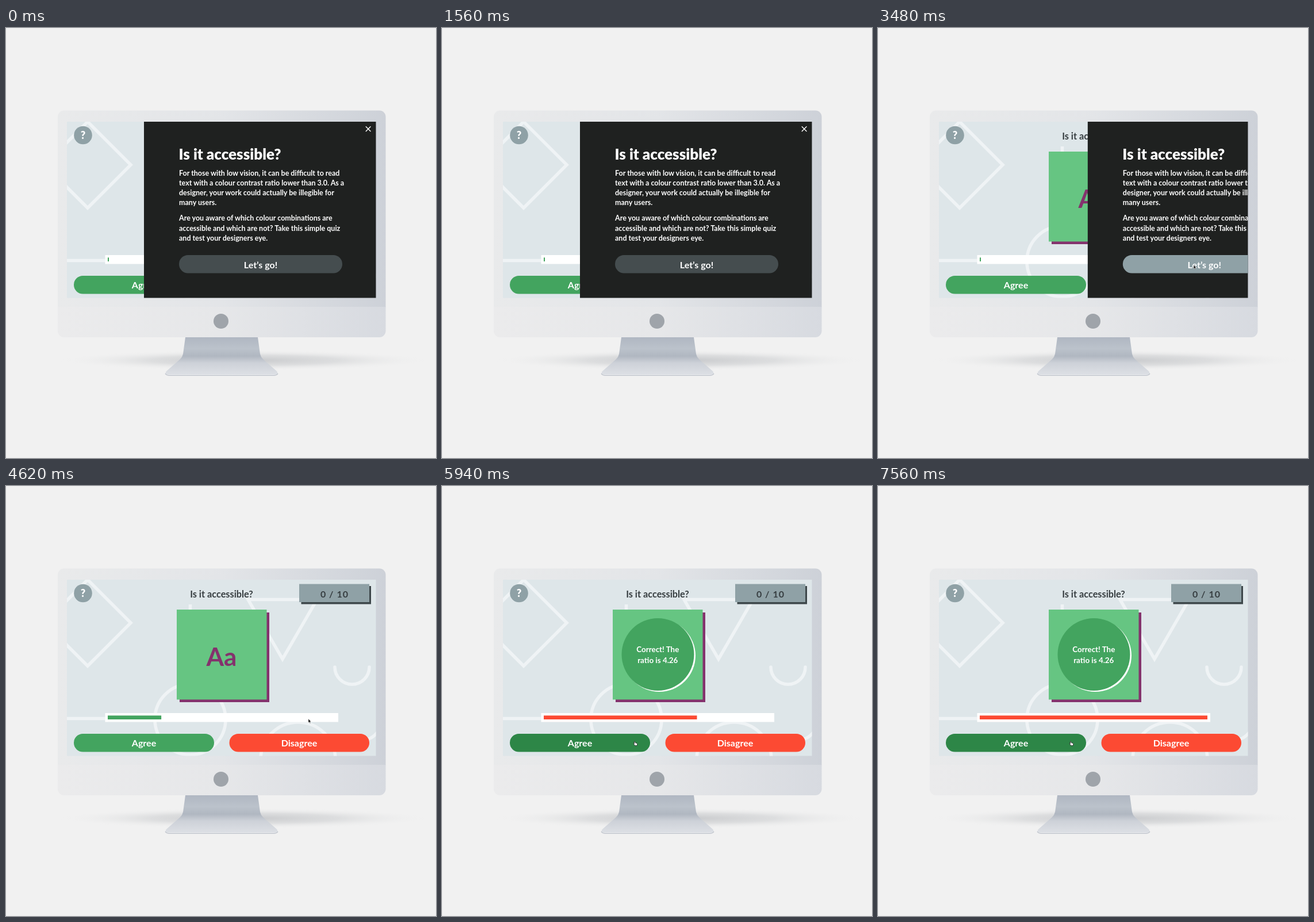
These frames come from a looping animation (748 by 748 pixels, 7.59 s). An HTML page:

```html
<!DOCTYPE html>
<html lang="en">
<head>
<meta charset="utf-8">
<title>Is it accessible?</title>
<style>
  html, body { margin: 0; width: 100%; height: 100%; overflow: hidden; background: #f1f1f1; }
  svg { display: block; width: 100vw; height: 100vh; }
  text { font-family: Lato, "Open Sans", sans-serif; font-weight: 700; fill: #fff; }
  .mid { text-anchor: middle; }
  .label { font-size: 16px; }
  .body { font-size: 12.5px; }
  .note { font-size: 13.4px; }
  .title { font-size: 26px; font-weight: 900; }
</style>
</head>
<body>
<svg viewBox="0 0 748 748">
  <defs>
    <linearGradient id="bezel">
      <stop offset="0" stop-color="#e9eaeb"/>
      <stop offset=".5" stop-color="#e3e5e8"/>
      <stop offset="1" stop-color="#cdd1d8"/>
    </linearGradient>
    <linearGradient id="chin">
      <stop offset="0" stop-color="#ebebec"/>
      <stop offset=".5" stop-color="#e6e7e9"/>
      <stop offset="1" stop-color="#d7dae0"/>
    </linearGradient>
    <linearGradient id="stand" x2="0" y2="1">
      <stop offset="0" stop-color="#b0b7c2"/>
      <stop offset=".3" stop-color="#bbc2cb"/>
      <stop offset=".5" stop-color="#b0b7c1"/>
      <stop offset=".68" stop-color="#cdd1d8"/>
      <stop offset="1" stop-color="#dde0e5"/>
    </linearGradient>
    <radialGradient id="shade">
      <stop offset="0" stop-color="#9da0a5" stop-opacity=".5"/>
      <stop offset=".5" stop-color="#adb0b4" stop-opacity=".3"/>
      <stop offset="1" stop-color="#f1f1f1" stop-opacity="0"/>
    </radialGradient>
    <clipPath id="screen"><rect x="106" y="163" width="537.5" height="306.5"/></clipPath>
    <clipPath id="case"><rect x="90" y="143.5" width="570.5" height="394.5" rx="11"/></clipPath>
  </defs>

  <rect width="748" height="748" fill="#f1f1f1"/>
  <ellipse cx="415" cy="578" rx="325" ry="18" fill="url(#shade)"/>
  <path d="M312 538H438L442 567Q443 572 447 576L471 597Q475 602 469 603.5H281Q275 602 279 597L303 576Q307 572 308 567Z" fill="url(#stand)"/>
  <path d="M277 601Q279 604.5 284 604.5H466Q471 604.5 473 601" fill="none" stroke="#b9bec7" stroke-width="1.2"/>

  <g clip-path="url(#case)">
    <rect x="90" y="143" width="571" height="343" fill="url(#bezel)"/>
    <rect x="90" y="485" width="571" height="53" fill="url(#chin)"/>
  </g>
  <circle cx="374" cy="510" r="13" fill="#9fa4aa"/>

  <g clip-path="url(#screen)">
    <rect x="106" y="163" width="538" height="307" fill="#dee6e9"/>
    <g fill="none" stroke="#eff3f5" stroke-width="5.5">
      <path d="M142 163L217 238L142 313L67 238Z"/>
      <path d="M106 404.5H258M320.5 206V343"/>
      <circle cx="320.5" cy="406" r="61.5"/>
      <path d="M421 197.5H541L481 301Z"/>
      <path d="M572 315A30 30 0 0 0 632 315" stroke-linecap="round"/>
      <circle cx="508" cy="476" r="65"/>
      <path d="M628 441Q639 438 648 426"/>
    </g>

    <circle cx="134" cy="186.5" r="15.8" fill="#8fa1a6"/>
    <text x="134" y="193" class="mid" font-size="18" style="font-weight:900">?</text>
    <text x="375" y="193.5" class="mid" font-size="16.3" style="fill:#363d40">Is it accessible?</text>

    <rect x="513.5" y="174" width="121.5" height="31.5" fill="#3d474a"/>
    <rect x="510" y="170.5" width="122" height="31.5" fill="#8fa1a6"/>
    <text x="571.5" y="193.5" class="mid" font-size="16" letter-spacing="1" style="fill:#363d40">0 / 10</text>

    <rect x="302" y="220" width="156" height="156" fill="#84326d"/>
    <rect x="297" y="215" width="156.5" height="156.5" fill="#66c582"/>
    <text x="375" y="313" class="mid" font-size="44" style="fill:#84326d" id="sample">Aa</text>
    <g id="answer">
      <circle cx="378" cy="295" r="63" fill="#fff"/>
      <circle cx="375.5" cy="293" r="63" fill="#43a45f"/>
      <text x="375.3" y="289" class="mid note">Correct! The</text>
      <text x="375.3" y="308" class="mid note">ratio is 4.26</text>
    </g>

    <rect x="172.5" y="395" width="405.5" height="15.5" fill="#fff"/>
    <rect id="bar" x="177" y="399.3" height="6.7"/>

    <rect id="agree" x="118" y="431" width="244" height="31.5" rx="15.75"/>
    <text x="240" y="453" class="mid label">Agree</text>
    <rect x="388.5" y="431" width="243.5" height="31.5" rx="15.75" fill="#fc4a33"/>
    <text x="510" y="453" class="mid label">Disagree</text>

    <g id="panel">
      <rect x="240" y="163" width="404" height="307" fill="#1f2120"/>
      <path d="M625.8 171.3L634.4 179.9M634.4 171.3L625.8 179.9" stroke="#fff" stroke-width="1.4"/>
      <text x="300.5" y="229" class="title">Is it accessible?</text>
      <g id="copy"></g>
      <rect id="go" x="301" y="395" width="284" height="31.5" rx="15.75"/>
      <text x="443" y="417.5" class="mid label">Let’s go!</text>
    </g>

    <g id="cursor">
      <path id="arrow" d="M0 0V6.8L1.6 5.4L2.7 7.7L3.7 7.2L2.7 5H4.6Z" fill="#111" stroke="#fff" stroke-width=".4"/>
      <path id="hand" d="M-1.6-3.6Q-.6-4.2-.1-3L.5-1.2L3-.6Q4-.2 3.8 1L3.2 3.6H-.4L-3-.1Q-2.6-1-1.2 0Z" fill="#fff" stroke="#222" stroke-width=".8"/>
    </g>
  </g>
</svg>
<script>
  const LOOP = 7590;
  const $ = id => document.getElementById(id);
  const clamp = v => Math.min(1, Math.max(0, v));
  const span = (t, from, to) => clamp((t - from) / (to - from));
  const smooth = p => p * p * (3 - 2 * p);

  const copy = [
    [257, 'For those with low vision, it can be difficult to read'],
    [274.2, 'text with a colour contrast ratio lower than 3.0. As a'],
    [291.3, 'designer, your work could actually be illegible for'],
    [308.4, 'many users.'],
    [335.3, 'Are you aware of which colour combinations are'],
    [352.5, 'accessible and which are not? Take this simple quiz'],
    [369.6, 'and test your designers eye.']
  ];
  $('copy').innerHTML = copy
    .map(([y, line]) => `<text x="301" y="${y}" class="body">${line}</text>`).join('');

  // The standard CSS "ease" curve, solved by bisection.
  function ease(p) {
    let lo = 0, hi = 1;
    const bezier = (u, a, b) => 3 * u * (1 - u) ** 2 * a + 3 * u * u * (1 - u) * b + u ** 3;
    for (let i = 0; i < 18; i++) {
      const u = (lo + hi) / 2;
      if (bezier(u, .25, .25) < p) lo = u; else hi = u;
    }
    return bezier(lo, .1, 1);
  }

  function mix(a, b, p) {
    return `rgb(${a.map((v, i) => Math.round(v + (b[i] - v) * p))})`;
  }

  // Pointer path: time, x, y
  const path = [
    [1800, 652, 440],
    [2300, 549, 414],
    [4380, 549, 411],
    [4620, 526, 405],
    [5200, 336, 448]
  ];

  function pointer(t) {
    const i = path.findIndex(step => step[0] > t);
    if (i === 0) return path[0].slice(1);
    if (i < 0) return path[path.length - 1].slice(1);
    const [t0, x0, y0] = path[i - 1], [t1, x1, y1] = path[i];
    const p = smooth(span(t, t0, t1));
    return [x0 + (x1 - x0) * p, y0 + (y1 - y0) * p];
  }

  function draw(t) {
    const slide = 404 * ease(span(t, 3378, 3878));
    $('panel').setAttribute('transform', `translate(${slide})`);
    $('go').setAttribute('fill', mix([69, 77, 79], [143, 161, 166], span(t, 2120, 2320)));

    const spent = span(t, 3927, 6927);
    $('bar').setAttribute('width', 2 + 394 * spent);
    $('bar').setAttribute('fill', spent < .5 ? '#43a45f' : '#fc4a33');

    $('agree').setAttribute('fill', mix([67, 164, 95], [45, 134, 71], span(t, 5100, 5300)));
    const shown = span(t, 5500, 5700);
    $('answer').setAttribute('opacity', shown);
    $('sample').setAttribute('opacity', 1 - shown);

    const [x, y] = pointer(t);
    const hand = (t > 2120 && t < 3400) || t > 5100;
    $('cursor').setAttribute('transform', `translate(${x} ${y})`);
    $('hand').setAttribute('visibility', hand ? 'visible' : 'hidden');
    $('arrow').setAttribute('visibility', hand ? 'hidden' : 'visible');
  }

  function tick() {
    draw(performance.now() % LOOP);
    requestAnimationFrame(tick);
  }
  tick();
</script>
</body>
</html>
```
